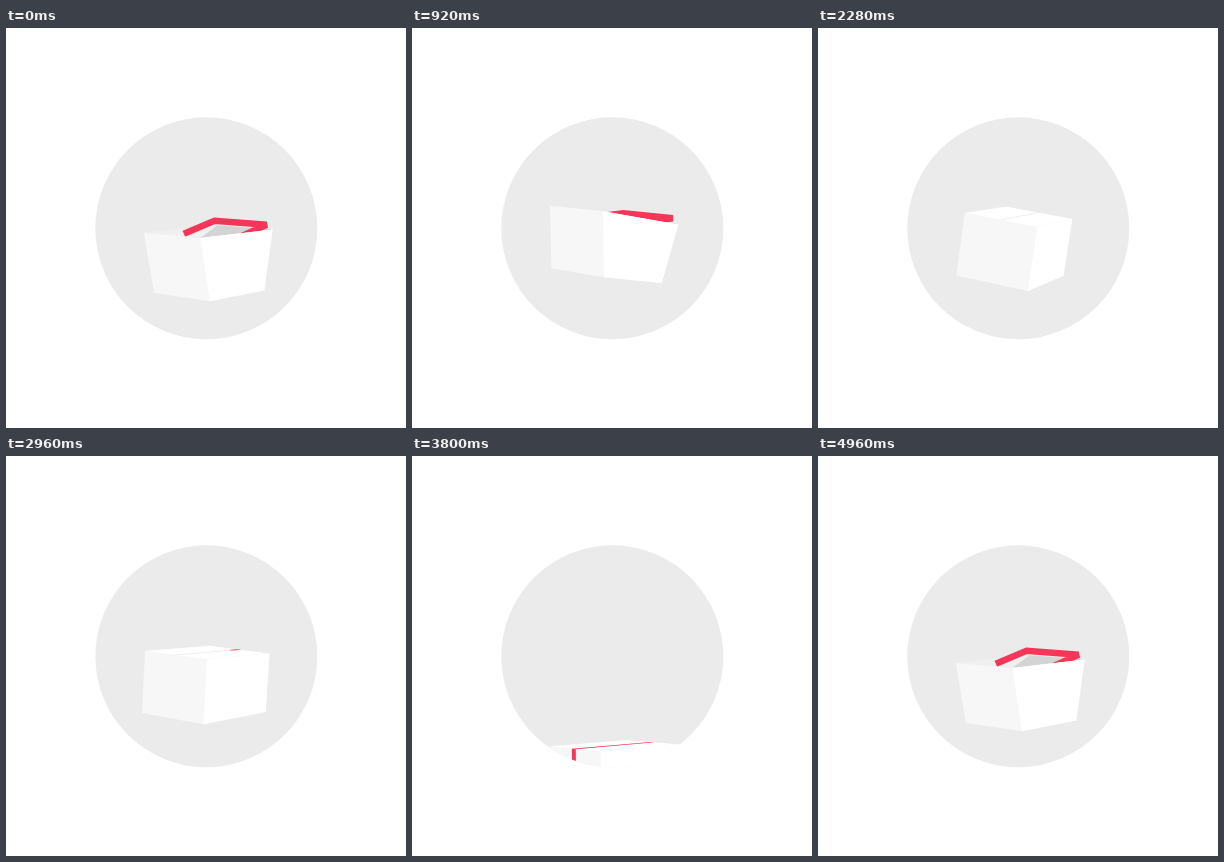
These frames come from a looping animation (400x400 px, 5000 ms). An HTML page with a canvas:

```html
<!DOCTYPE html>
<html lang="en">
<head>
<meta charset="utf-8">
<title>Basket becomes a parcel</title>
<style>
html, body { margin: 0; height: 100%; overflow: hidden; background: #fff; }
canvas { display: block; }
</style>
</head>
<body>
<canvas width="400" height="400"></canvas>
<script>
const ctx = document.querySelector('canvas').getContext('2d');
const RED = '#f63659', LIGHT = '#f7f7f7', WHITE = '#fff';
const LOOP = 5000, STEP = 40, LEAVE = 3840, ENTER = 4560;
const { sin, cos, PI } = Math;

// Half sizes of the box, and the camera distance
const A = 37, B = 55, H = 30.5, CAMERA = 900;

const smooth = k => k * k * (3 - 2 * k);
const easeIn = k => k ** 3;
const easeOut = k => 1 - (1 - k) ** 3;
const mix = (a, b, k) => a + (b - a) * k;
const progress = (t, a, b) => Math.min(1, Math.max(0, (t - a) / (b - a)));

// Centre of the box and its turn in degrees; ease leads to the next pose
const open = { t: 0, x: 203.5, y: 233.5, yaw: 41.2, pitch: 7.5, roll: 0 };
const taped = { t: 3480, x: 203, y: 232, yaw: 45.5, pitch: 7, roll: 0, ease: easeIn };
const poses = [
  open,
  { t: 920, x: 199, y: 217.5, yaw: 44, pitch: 0, roll: 7.8 },
  { t: 1640, x: 205, y: 219, yaw: 33.8, pitch: 4.6, roll: -4.6 },
  { t: 2280, x: 198.5, y: 218, yaw: 19.5, pitch: 9, roll: 8.2 },
  taped,
  { ...taped, t: LEAVE, y: 357 },
  { t: ENTER, x: 205, y: 91, yaw: 5, pitch: 2, roll: 0, ease: easeOut },
  { ...open, t: 4960, y: 235.5 },
  { ...open, t: LOOP }
];

function poseAt(t) {
  const i = poses.findIndex(p => p.t > t) - 1;
  const a = poses[i], b = poses[i + 1];
  const k = (a.ease || smooth)(progress(t, a.t, b.t));
  const at = key => mix(a[key], b[key], k);
  const angle = key => at(key) * PI / 180;
  return { x: at('x'), y: at('y'), yaw: angle('yaw'), pitch: angle('pitch'), roll: angle('roll') };
}

// u runs along the left face, v along the right face, y upwards
function camera({ x, y: top, yaw, pitch, roll }) {
  return (u, v, y) => {
    const across = v * sin(yaw) - u * cos(yaw);
    const depth = u * sin(yaw) + v * cos(yaw);
    const scale = CAMERA / (CAMERA + depth * cos(pitch) - y * sin(pitch));
    const px = across * scale;
    const py = -(y * cos(pitch) + depth * sin(pitch)) * scale;
    return [x + px * cos(roll) - py * sin(roll), top + px * sin(roll) + py * cos(roll)];
  };
}

function trace(points) {
  ctx.beginPath();
  points.forEach(p => ctx.lineTo(...p));
}
function fill(color, ...points) {
  trace(points);
  ctx.closePath();
  ctx.fillStyle = color;
  ctx.fill();
}
function line(color, width, ...points) {
  trace(points);
  ctx.strokeStyle = color;
  ctx.lineWidth = width;
  ctx.miterLimit = 2;
  ctx.stroke();
}

function drawHandle(point, t) {
  const late = t >= ENTER;
  const angle = late ? .21 : mix(.21, PI / 2, smooth(progress(t, 1120, 1400)));
  const arm = late ? 49 : 49 * (1 - smooth(progress(t, 1400, 1600)));
  if (!arm) return;
  const side = A * .94, pivot = H - 5;
  const v = arm * cos(angle), y = pivot + arm * sin(angle);
  line(RED, 6.5, point(side, 0, pivot), point(side, v, y), point(-side, v, y), point(-side, 0, pivot));
}

// side is -1 for the front flap, 1 for the back one; angle 0 is shut
function drawFlap(point, side, angle) {
  const u = side * A * (1 - cos(angle)), y = H + A * sin(angle);
  fill(WHITE, point(side * A, -B, H), point(side * A, B, H), point(u, B, y), point(u, -B, y));
}

function drawTape(point, t) {
  const w = 2.8;
  const end = mix(B, -B, progress(t, 2900, 3300));
  const hang = 15 * progress(t, 3300, 3460);
  fill(RED, point(-w, B, H), point(w, B, H), point(w, end, H), point(-w, end, H));
  fill(RED, point(-w, -B, H), point(w, -B, H), point(w, -B, H - hang), point(-w, -B, H - hang));
}

function drawBox(t) {
  const point = camera(poseAt(t));
  const base = B * (t < ENTER ? mix(.76, 1, smooth(progress(t, 920, 1640))) : .76);
  const left = point(A, -B, H), front = point(-A, -B, H), right = point(-A, B, H), back = point(A, B, H);
  const baseLeft = point(A, -base, -H), baseFront = point(-A, -base, -H), baseRight = point(-A, base, -H);
  const closing = t > 1680 && t < LEAVE;
  const angle = 1.5 * PI * (1 - smooth(progress(t, 1680, 2240)));
  const outside = angle > PI / 2;

  if (closing && outside) drawFlap(point, 1, angle);
  fill('#f0f0f0', left, back, front);
  fill('#d4d4d4', back, right, front);
  drawHandle(point, t);
  if (closing && !outside) drawFlap(point, 1, angle);

  fill(LIGHT, left, front, right, baseRight, baseFront, baseLeft);
  fill(WHITE, front, right, baseRight, baseFront);
  if (closing) {
    drawFlap(point, -1, angle);
    if (!angle) line('#f0f0f0', 1, point(0, -B, H), point(0, B, H));
    drawTape(point, t);
  }
}

function draw(t) {
  ctx.clearRect(0, 0, 400, 400);
  ctx.save();
  ctx.beginPath();
  ctx.arc(200.3, 200.3, 111, 0, 2 * PI);
  ctx.fillStyle = '#ebebeb';
  ctx.fill();
  ctx.clip();
  if (t < LEAVE || t >= ENTER) drawBox(t);
  ctx.restore();
}

const start = performance.now();
function frame() {
  const t = (performance.now() - start) % LOOP;
  draw(Math.floor(t / STEP) * STEP);
  requestAnimationFrame(frame);
}
frame();
</script>
</body>
</html>
```
